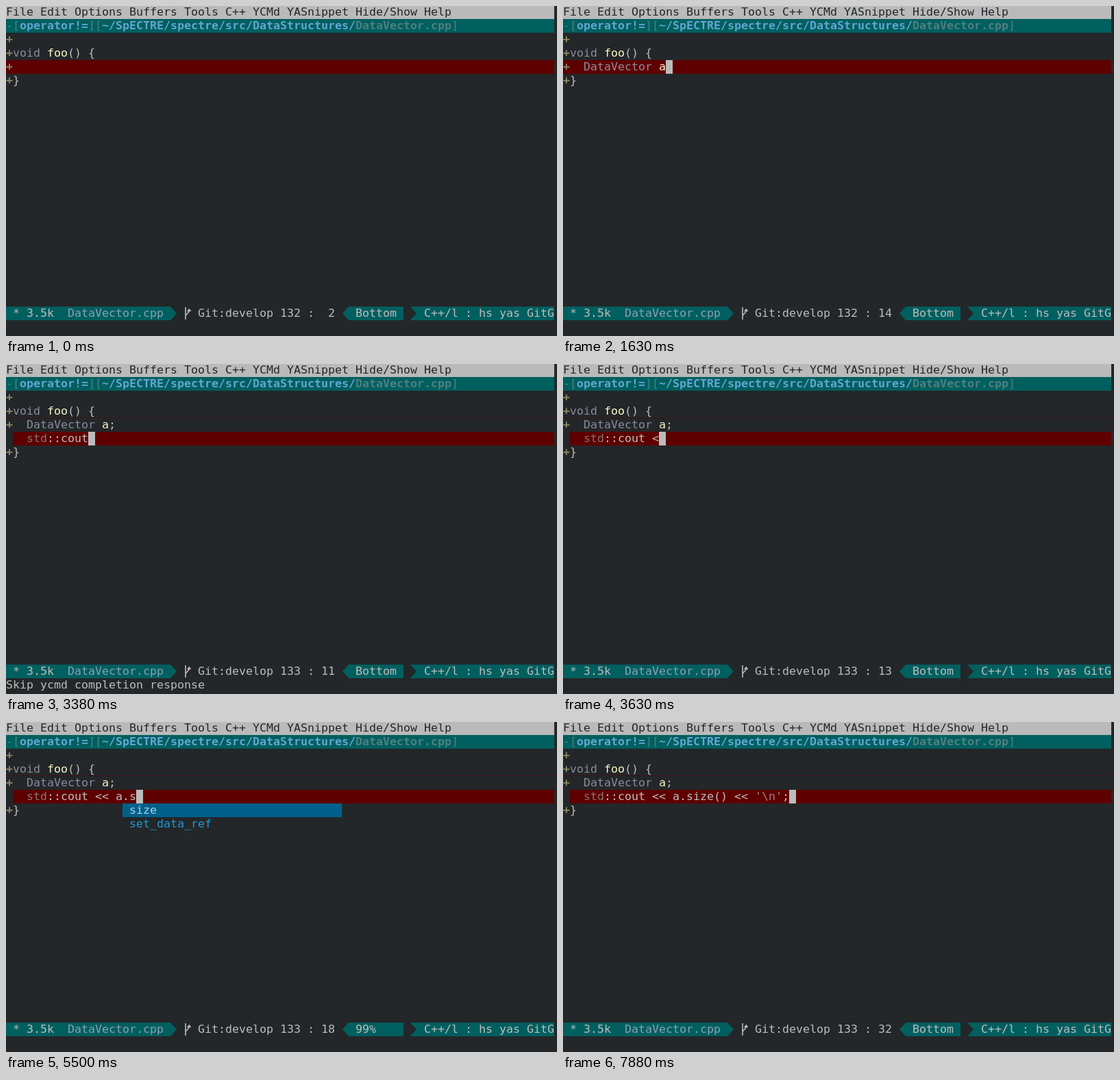
These frames come from a looping animation (804 px wide and 482 px high, 8000 ms). An HTML page:

```html
<!DOCTYPE html>
<html lang="en">
<head>
<meta charset="utf-8">
<title>Typing in a terminal editor</title>
<style>
  html, body { margin: 0; width: 100%; height: 100%; overflow: hidden; background: #232729; }
  #screen { position: absolute; left: 0; top: 0; width: 804px; height: 482px; overflow: hidden;
    font: 16.61px/20px "DejaVu Sans Mono", monospace; }
  #screen span { position: absolute; height: 20px; white-space: pre; }
  .arrow { position: absolute; top: 439px; width: 10px; height: 20px; }
  .right { clip-path: polygon(0 0, 90% 50%, 0 100%); }
  .left { clip-path: polygon(100% 0, 10% 50%, 100% 100%); }
  svg { position: absolute; left: 260px; top: 439px; }
</style>
</head>
<body>
<div id="screen">
  <div id="fixed"></div>
  <div id="live"></div>
  <i class="arrow right" style="left:240px;background:#005f5f"></i>
  <i class="arrow left" style="left:490px;background:#005f5f"></i>
  <i class="arrow right" style="left:590px;background:#232729"></i>
  <svg width="10" height="20" fill="none" stroke="#bcbcbc" stroke-width="1.6">
    <path d="M2 1V19M2 14C2 10 7.3 11 7.3 5M4.8 7L7.3 4L9.6 7"/>
  </svg>
</div>
<script>
const LOOP = 8000, STEP = 125, CELL = 10, ROW = 20, COLS = 80;
const C = {
  bg: '#232729', teal: '#005f5f', red: '#5f0000', text: '#bcbcbc', menu: '#bababa',
  dim: '#4f8080', path: '#62a6d2', name: '#87a0b4', plus: '#87875f', type: '#8c8a9e',
  cream: '#f8f4c4', space: '#857272', string: '#a08080', pick: '#00608a',
  pickText: '#a9d3e4', item: '#1f9ad6', note: '#93a8a4', match: '#8080a0'
};

const fixed = document.getElementById('fixed');
const live = document.getElementById('live');
let layer = fixed;

function put(row, col, text, color, back, bold) {
  const s = document.createElement('span');
  s.textContent = text;
  s.style.cssText = `left:${col * CELL}px;top:${row * ROW - 1}px;width:${text.length * CELL}px;color:${color};` +
    (back ? `background:${back};` : '') + (bold ? 'font-weight:bold' : '');
  layer.append(s);
}

// Writes [text, color, bold] runs one after another.
function runs(row, col, list) {
  for (const [text, color, bold] of list) {
    put(row, col, text, color, null, bold);
    col += text.length;
  }
}

function band(row, col, cols, color) {
  put(row, col, ' '.repeat(cols), color, color);
}

// Latest value of a [step, value] table.
function at(table, n) {
  let v = 0;
  for (const [start, value] of table) if (n >= start) v = value;
  return v;
}

const DECL = 'DataVector a;', PRINT = "std::cout << a.size() << '\\n';";
const NEWLINE = 17;
const declKeys = n => n < 15 ? Math.min(Math.max(n - 1, 0), 12) : 13;
const printKeys = [
  [19, 1], [20, 2], [23, 3], [24, 4], [25, 6], [26, 7], [27, 9], [28, 10], [29, 11],
  [31, 12], [33, 13], [36, 14], [38, 15], [40, 16], [46, 17], [47, 18], [48, 19], [49, 21],
  [52, 22], [54, 23], [55, 24], [56, 25], [58, 26], [59, 27], [60, 28], [61, 29], [62, 30]
];
const skipShown = [[24, 1], [28, 0], [40, 1], [42, 0]];
const IDS = ['size_t', 'ScalarTag', 'ScalarTag2', 'ScalarTag3', 'ScalarTag4',
  'SPECTRE_TEST_CASE', 'std', 'str', 'stack', 'start'];
const STD_IDS = ['std'];
const MEMBERS = ['size', 'set_data_ref'];
const popups = [
  { from: 21, to: 23, col: 2, cols: 27, items: IDS, note: ' -> [ID]' },
  { from: 23, to: 24, col: 2, cols: 27, items: STD_IDS, note: ' -> [ID]' },
  { from: 43, to: 47, col: 17, cols: 32, items: MEMBERS, note: '' }
];

function drawFixed() {
  band(0, 0, COLS, C.menu);
  put(0, 0, 'File Edit Options Buffers Tools C++ YCMd YASnippet Hide/Show Help', '#232729');
  band(1, 0, COLS, C.teal);
  runs(1, 0, [['-[', C.dim], ['operator!=', C.path, 1], ['][', C.dim],
    ['~/SpECTRE/spectre/src/DataStructures/', C.path, 1], ['DataVector.cpp', C.dim, 1], [']', C.dim]]);
  put(2, 0, '+', C.plus, null, 1);
  runs(3, 0, [['+', C.plus, 1], ['void ', C.type], ['foo', C.cream], ['() {', C.text]]);
  band(22, 0, 24, C.teal);
  runs(22, 1, [['* 3.5k  ', C.text], ['DataVector.cpp', C.name]]);
  put(22, 28, 'Git:develop', C.text);
  band(22, 50, 8, C.teal);
  band(22, 59, 21, C.teal);
  put(22, 61, 'C++/l : hs yas GitG', C.text);
}

function drawDecl(count) {
  if (count < 11) return put(4, 3, DECL.slice(0, count), C.text);
  runs(4, 3, [['DataVector ', C.type], [DECL.slice(11, Math.min(count, 12)), C.cream],
    [DECL.slice(12, count), C.text]]);
}

function drawPrint(count) {
  const part = (a, b) => PRINT.slice(a, Math.min(b, count));
  runs(5, 3, [[part(0, 3), count > 3 ? C.space : C.text], [part(3, 25), C.text],
    [part(25, 29), C.string], [part(29, 30), C.text]]);
  if (count === 21) put(5, 22, '()', '#30303c', C.match);
}

function drawPopup({ col, cols, items, note }) {
  items.forEach((item, i) => {
    const row = 6 + i, end = col + 1 + item.length;
    if (!i) band(row, col, cols, C.pick);
    put(row, col + 1, item, i ? C.item : C.pickText);
    put(row, end, note, C.note, i ? C.teal : null);
  });
}

function draw(n) {
  live.textContent = '';
  layer = live;
  const second = n >= NEWLINE;
  const decl = declKeys(n), print = at(printKeys, n);
  const row = second ? 5 : 4, col = 2 + (second ? print : decl);
  const popup = popups.find(p => n >= p.from && n < p.to);

  band(row, second ? 1 : 0, second ? COLS - 1 : COLS, C.red);
  put(4, 0, '+', C.plus, null, 1);
  drawDecl(decl);
  if (second) {
    const edge = document.createElement('span');
    edge.style.cssText = 'left:0;top:78px;width:800px;height:1px;background:#441216';
    live.append(edge);
    drawPrint(print);
  }
  runs(row + 1, 0, [['+', C.plus, 1], ['}', C.text]]);
  if (n > 0) band(row, col + 1, 1, C.text);
  if (popup) drawPopup(popup);

  put(22, 40, `${second ? 133 : 132} : ${String(col).padStart(2)}`, C.text);
  put(22, 51, popup ? '99%' : 'Bottom', C.text);
  if (at(skipShown, n)) put(23, 0, 'Skip ycmd completion response', C.text);
}

drawFixed();
let shown = -1;
const begin = performance.now();
function tick() {
  const t = Math.max(0, performance.now() - begin) % LOOP;
  const n = Math.floor(Math.floor(t / 10) * 10 / STEP);
  if (n !== shown) draw(shown = n);
  requestAnimationFrame(tick);
}
tick();
</script>
</body>
</html>
```
